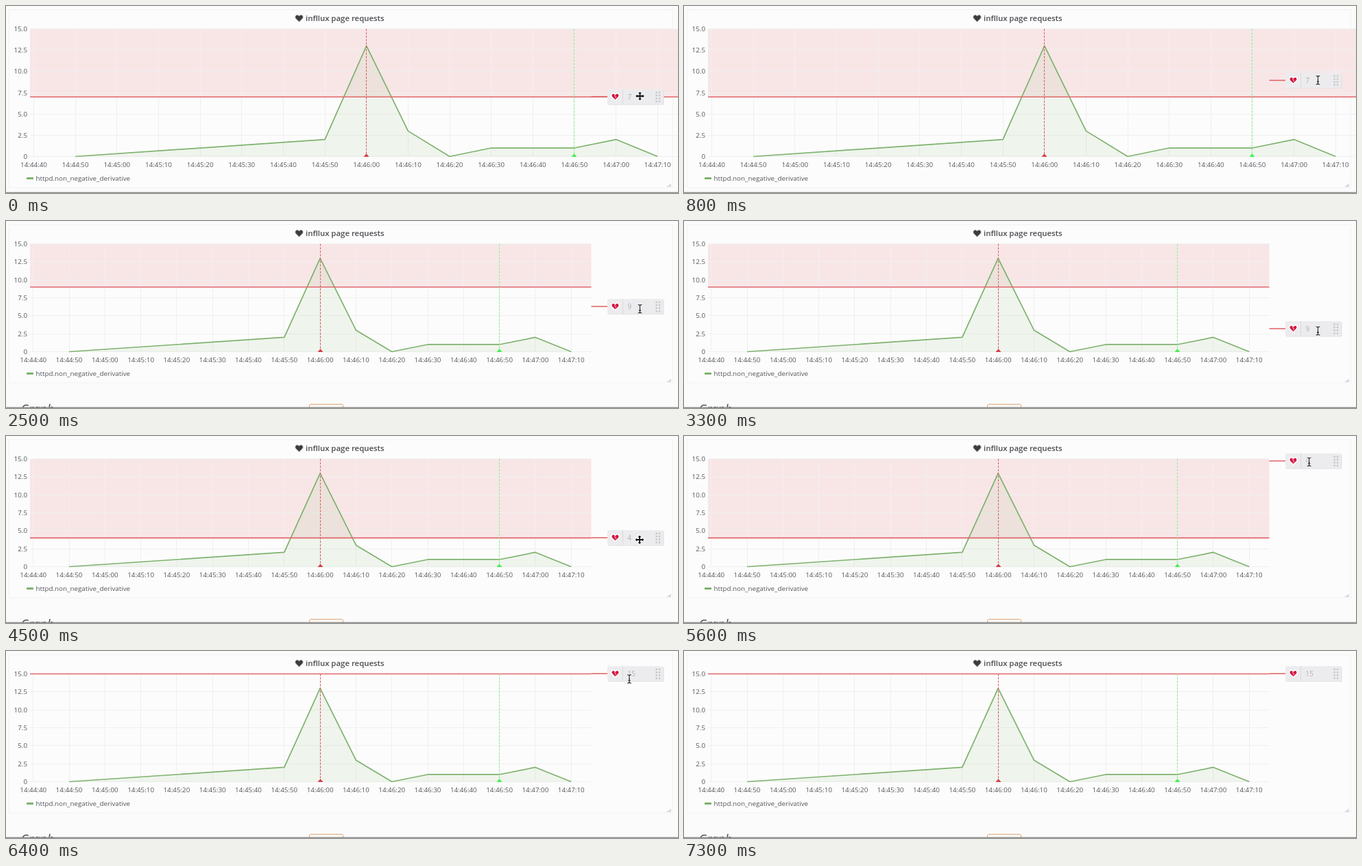
Animation, 980 px wide and 274 px high, one loop 8.5 s. Source, as an HTML page:

```html
<!DOCTYPE html>
<html lang="en">
<head>
<meta charset="utf-8">
<title>Alert threshold</title>
<style>
html, body { margin: 0; width: 980px; height: 274px; overflow: hidden; background: #fbfbfb; }
svg { display: block; font-family: "Open Sans", "Noto Sans", sans-serif; }
.tick, .legend { font-size: 9.8px; fill: #55575c; }
.title { font-size: 11.4px; font-weight: 600; fill: #4a4c50; }
.value { font-size: 10px; fill: #b2b2b4; }
.grid { stroke: #efefef; fill: none; }
.limit { stroke: #e2666a; stroke-width: 1.6; }
</style>
</head>
<body>
<svg id="stage" width="980" height="274" viewBox="0 0 980 274"></svg>
<script>
const LOOP = 8500, STEP = 100, TOP = 33.5, LEFT = 35;
const HEART = 'M0 5.2L-4.9.4C-7.3-2.4-4-6.4-1-4.3L0-3.3L1-4.3C4-6.4 7.3-2.4 4.9.4Z';
const stage = document.getElementById('stage');

// x0: first tick, dx: tick spacing, y0: zero line, right: end of plot
const wide = { x0: 40.5, dx: 60.65, y0: 220.5, right: 980 };
const slim = { x0: 39.7, dx: 52.3, y0: 191.5, right: 853.5 };
const series = [[1, 0], [7, 2], [8, 13], [9, 3], [10, 0], [11, 1], [13, 1], [14, 2], [15, 0]];

const el = (tag, attrs, parent = stage, text = '') => {
  const node = document.createElementNS('http://www.w3.org/2000/svg', tag);
  for (const k in attrs) node.setAttribute(k, attrs[k]);
  node.textContent = text;
  return parent.appendChild(node);
};
const show = (node, on) => node.setAttribute('visibility', on ? 'visible' : 'hidden');
const place = (node, x, y) => node.setAttribute('transform', `translate(${x} ${y})`);
const yOf = (lay, v) => lay.y0 - v * (lay.y0 - TOP) / 15;

function clock(i) {
  const s = 40 + i * 10;
  return `14:${44 + Math.floor(s / 60)}:${String(s % 60).padStart(2, '0')}`;
}

function chart(lay) {
  const g = el('g', {});
  const X = i => lay.x0 + i * lay.dx, Y = v => yOf(lay, v);
  const bottom = lay.y0 + 45.5;
  el('rect', { x: 4.5, y: 5.5, width: 968, height: bottom - 5.5, fill: '#fcfcfc', stroke: '#f3f3f4' }, g);
  el('path', { d: `M970 ${bottom - 6}v5h-7z`, fill: '#d9d9db' }, g);

  const region = el('rect', { x: LEFT, y: TOP, width: lay.right - LEFT, fill: '#f8e6e7' }, g);
  let grid = '';
  for (let i = 0; i < 16; i++) {
    grid += `M${Math.floor(X(i)) + .5} ${TOP}V${lay.y0}`;
    el('text', { class: 'tick', x: X(i), y: lay.y0 + 15.8, 'text-anchor': 'middle' }, g, clock(i));
  }
  for (let v = 0; v <= 15; v += 2.5) {
    grid += `M${LEFT} ${Math.floor(Y(v)) + .5}H${lay.right}`;
    el('text', { class: 'tick', x: 31, y: Y(v) + 3.6, 'text-anchor': 'end' }, g, v ? v.toFixed(1) : '0');
  }
  el('path', { class: 'grid', d: grid }, g);

  const line = 'M' + series.map(([i, v]) => `${X(i)} ${Y(v)}`).join('L');
  el('path', { d: line + 'Z', fill: '#7eb26d', 'fill-opacity': .1 }, g);
  el('path', { d: line, fill: 'none', stroke: '#7eb26d', 'stroke-width': 1.7, 'stroke-linejoin': 'round' }, g);
  const limit = el('line', { class: 'limit', x1: LEFT, x2: lay.right }, g);

  for (const [i, dash, mark] of [[8, '#e0585c', '#d64045'], [13, '#84f090', '#45f050']]) {
    const x = Math.floor(X(i)) + .5;
    el('path', { d: `M${x} ${TOP}V${lay.y0}`, stroke: dash, 'stroke-width': 1.1, 'stroke-dasharray': '3 2' }, g);
    el('path', { d: `M${x - 4} ${lay.y0 + .5}l4-4.8l4 4.8z`, fill: mark }, g);
  }
  el('rect', { x: 30, y: lay.y0 + 30.5, width: 10, height: 3, rx: .5, fill: '#7eb26d' }, g);
  el('text', { class: 'legend', x: 43.5, y: lay.y0 + 35.3 }, g, 'httpd.non_negative_derivative');

  return {
    g,
    set(v) {
      region.setAttribute('height', Y(v) - TOP);
      limit.setAttribute('y1', Y(v));
      limit.setAttribute('y2', Y(v));
    }
  };
}

const before = chart(wide), after = chart(slim);
el('text', { x: 21.5, y: 282, 'font-size': 17.5, 'font-style': 'italic', fill: '#444' }, after.g, 'Graph');
el('rect', { x: 442.5, y: 268.5, width: 49, height: 20, rx: 2.5, fill: '#fdfaf7', stroke: '#e0a577' }, after.g);

el('path', { d: HEART, transform: 'translate(427.5 18)', fill: '#3c3c3c', stroke: '#c4c4c4' });
el('text', { class: 'title', x: 437, y: 22 }, stage, 'infllux page requests');
el('rect', { x: 0, y: 272.7, width: 980, height: 1.3, fill: '#8c8c8c' });

// Drag handle, centred on y = 0
const handle = el('g', {});
el('path', { class: 'limit', d: 'M853.5-.3H877' }, handle);
el('rect', { x: 877.5, y: -10.5, width: 82, height: 22, rx: 2, fill: '#dedee0' }, handle);
el('rect', { x: 877, y: -11.3, width: 81.5, height: 22, rx: 2, fill: '#ececee' }, handle);
el('path', { d: 'M899.5-11V10.5', stroke: '#dadadc' }, handle);
const heart = el('g', { transform: 'translate(888.5 -.3)' }, handle);
el('path', { d: HEART, fill: '#d0173c', stroke: '#fff', 'stroke-width': 1.4 }, heart);
el('path', { d: 'M.3-3.4l-1.3 2.4l2.2.9l-1.2 2.4', fill: 'none', stroke: '#fbe', 'stroke-width': .9 }, heart);
const value = el('text', { class: 'value', x: 906.5, y: 3.6 }, handle);
for (let i = 0; i < 8; i++) {
  el('rect', { x: 947.4 + i % 2 * 4.4, y: -7.8 + (i >> 1) * 4.4, width: 2.4, height: 2.4, fill: '#c6c6ca' }, handle);
}

const cursor = el('g', {});
const move = el('g', { fill: '#111' }, cursor), beam = el('g', { fill: 'none' }, cursor);
for (const stroke of ['#fff', 'none']) {
  for (let a = 0; a < 360; a += 90) {
    el('path', { d: 'M0-6.3L2.6-3.8H.9V0H-.9V-3.8H-2.6Z', transform: `rotate(${a})`, stroke, 'stroke-width': 1.6 }, move);
  }
}
for (const [stroke, width] of [['#fff', 2.8], ['#222', 1.2]]) {
  for (const a of [0, 180]) {
    el('path', { d: 'M-2.8-6.2Q0-6.2 0-4.6Q0-6.2 2.8-6.2M0-4.6V.5', transform: `rotate(${a})`, stroke, 'stroke-width': width }, beam);
  }
  el('path', { d: 'M-1.6 2.2H1.6', stroke, 'stroke-width': width }, beam);
}

// Each drag pulls the handle to y = pull, then the drop sets a new limit
const drags = [
  { start: 300, end: 900, drop: 1000, pull: 108.5, limit: 9 },
  { start: 2200, end: 3300, drop: 3500, pull: 158, limit: 4 },
  { start: 4900, end: 5800, drop: 6200, pull: 31, limit: 15 }
];
// Cursor glides: start, end, x, y
const glides = [
  [300, 900, 924.5, 108], [900, 1100, 924.5, 114], [1700, 2000, 924.5, 100], [2200, 3300, 924.5, 161],
  [4400, 4500, 924, 152], [4900, 5800, 911, 32], [6200, 6400, 909, 41], [7000, 7200, 870, -20]
];

function ease(t, start, end, a, b) {
  const p = Math.min(1, Math.max(0, (t - start) / (end - start)));
  return a + (b - a) * p * (2 - p);
}

let last = -1;
const origin = performance.now();
function draw(now) {
  const t = Math.floor(Math.max(0, now - origin) % LOOP / STEP) * STEP;
  if (t !== last) {
    last = t;
    const resized = t >= drags[0].drop;
    const limit = drags.reduce((v, d) => t >= d.drop ? d.limit : v, 7);
    const rest = yOf(resized ? slim : wide, limit);
    const drag = drags.find(d => t >= d.start && t < d.drop);
    const hover = drags.some(d => t >= d.start - 400 && t <= d.start);

    show(before.g, !resized);
    show(after.g, resized);
    (resized ? after : before).set(limit);
    value.textContent = limit;
    place(handle, 0, drag ? ease(t, drag.start, drag.end, rest, drag.pull) : rest);

    let x = 924.5, y = 132;
    for (const [start, end, toX, toY] of glides) {
      x = ease(t, start, end, x, toX);
      y = ease(t, start, end, y, toY);
    }
    place(cursor, x, y);
    show(move, hover);
    show(beam, !hover);
  }
  requestAnimationFrame(draw);
}
draw(origin);
</script>
</body>
</html>
```
